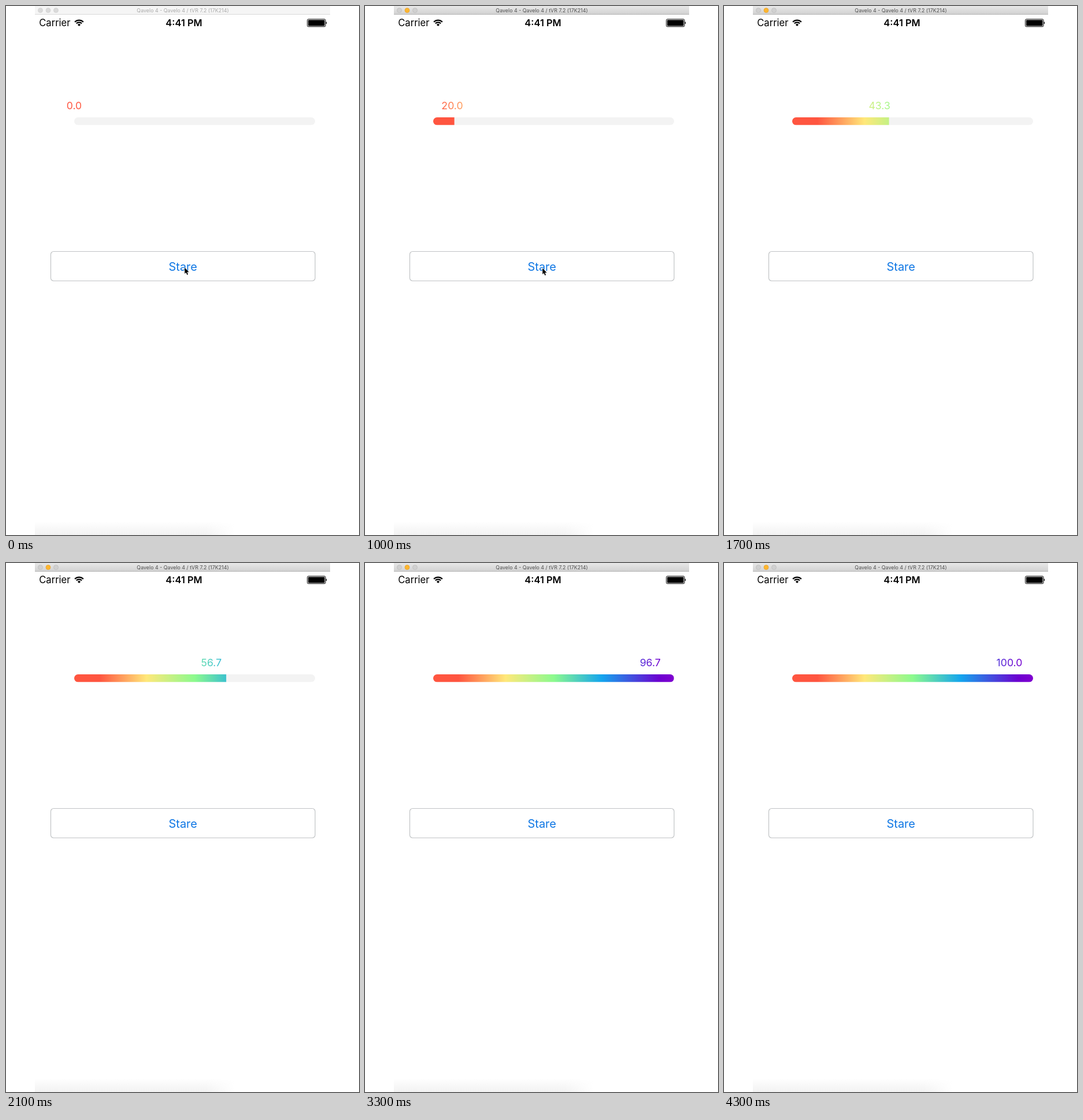
These frames come from a looping animation (611x917 px, 4.4 s). An HTML page:

```html
<!DOCTYPE html>
<html lang="en">
<head>
<meta charset="utf-8">
<title>Gradient progress bar</title>
<style>
  html, body { margin: 0; width: 100%; height: 100%; overflow: hidden; background: #fff; }
  svg { display: block; width: 100vw; height: 100vh; }
  text { font-family: Inter, Roboto, sans-serif; }
  .middle { text-anchor: middle; }
</style>
</head>
<body>
<svg viewBox="0 0 611 917">
  <defs>
    <linearGradient id="rainbow">
      <stop offset=".105" stop-color="#ff5540"/>
      <stop offset=".3" stop-color="#ffe87a"/>
      <stop offset=".5" stop-color="#8cfa8e"/>
      <stop offset=".7" stop-color="#14a5ee"/>
      <stop offset=".94" stop-color="#6d00d0"/>
      <stop offset="1" stop-color="#8000d0"/>
    </linearGradient>
    <linearGradient id="barPaint" href="#rainbow" gradientUnits="userSpaceOnUse" x1="118" x2="535"/>
    <linearGradient id="labelPaint" href="#rainbow" gradientUnits="userSpaceOnUse" x1="77" x2="535"/>
    <linearGradient id="titlePaint" x2="0" y2="1">
      <stop stop-color="#e8e8e8"/>
      <stop offset="1" stop-color="#d0d0d0"/>
    </linearGradient>
    <linearGradient id="shadowPaint" x2="0" y2="1">
      <stop stop-color="#fff"/>
      <stop offset="1" stop-color="#f2f2f2"/>
    </linearGradient>
    <linearGradient id="shadowEdge">
      <stop stop-color="#fff" stop-opacity="0"/>
      <stop offset="1" stop-color="#fff"/>
    </linearGradient>
    <clipPath id="track"><rect x="118" y="193" width="417" height="13.5" rx="6.75"/></clipPath>
  </defs>

  <rect x="50" y="893" width="345" height="24" fill="url(#shadowPaint)"/>
  <rect x="345" y="893" width="51" height="24" fill="url(#shadowEdge)"/>

  <!-- window title -->
  <rect id="titleBar" x="50" width="511" height="15"/>
  <path id="titleLine" d="M50 14.5H561"/>
  <g stroke-width=".7">
    <circle class="dot" cx="59.5" cy="7.5" r="4"/>
    <circle class="dot" id="middleDot" cx="73" cy="7.5" r="4"/>
    <circle class="dot" cx="86.5" cy="7.5" r="4"/>
  </g>
  <text id="title" class="middle" x="306" y="11" font-size="8.9">Qavelo 4 - Qavelo 4 / tVR 7.2 (17K214)</text>

  <!-- status bar -->
  <text x="57.2" y="35" font-size="16.6">Carrier</text>
  <g fill="none" stroke="#000" stroke-width="2.2">
    <path d="M119.1 27.6a10.5 10.5 0 0 1 14.8 0M121.8 30.3a6.6 6.6 0 0 1 9.4 0"/>
    <path d="M126.5 35l-2.6-2.6a3.6 3.6 0 0 1 5.2 0z" fill="#000" stroke="none"/>
  </g>
  <text class="middle" x="308" y="35" font-size="16.4" font-weight="600">4:41 PM</text>
  <rect x="521.5" y="22.8" width="31.5" height="13" rx="2" fill="none" stroke="#000"/>
  <rect x="523" y="24.2" width="28.5" height="10.2" rx=".8"/>
  <path d="M553.7 27q1.4 .4 1.4 2.3t-1.4 2.3z"/>

  <!-- progress -->
  <text id="label" class="middle" y="179" font-size="17.7" fill="url(#labelPaint)"></text>
  <g clip-path="url(#track)">
    <rect x="118" y="193" width="417" height="13.5" fill="#f3f3f3"/>
    <rect id="bar" x="118" y="193" height="13.5" fill="url(#barPaint)"/>
  </g>

  <!-- button -->
  <rect x="77.5" y="425.5" width="457.5" height="51" rx="5" fill="#fff" stroke="#c0c3c5" stroke-width="1.2"/>
  <text id="caption" class="middle" x="306.2" y="458.7" font-size="20" fill="#0f77e4">Stare</text>
  <path id="cursor" d="M0 0V10.4L2.4 8.3L4.1 12.3L5.8 11.6L4.1 7.6H7.4Z" stroke="#fff" stroke-width=".9" paint-order="stroke"/>
</svg>
<script>
  const LOOP = 4400, STEP = 100;
  const TRACK_X = 118, TRACK_WIDTH = 417, LABEL_TRAVEL = 376;
  const $ = id => document.getElementById(id);
  const clamp = v => Math.min(1, Math.max(0, v));
  const set = (element, attributes) => {
    for (const name in attributes) element.setAttribute(name, attributes[name]);
  };

  // cubic-bezier(.42, 0, .58, 1)
  function easeInOut(x) {
    let low = 0, high = 1;
    for (let i = 0; i < 24; i++) {
      const s = (low + high) / 2;
      if (1.26 * s - 0.78 * s * s + 0.52 * s ** 3 < x) low = s; else high = s;
    }
    return low * low * (3 - 2 * low);
  }

  function drawTitle(active) {
    set($('titleBar'), { fill: active ? 'url(#titlePaint)' : '#f5f5f5' });
    set($('titleLine'), { stroke: active ? '#b4b4b4' : '#dadada' });
    set($('title'), { fill: active ? '#505050' : '#aaa' });
    for (const dot of document.querySelectorAll('.dot')) {
      const lit = active && dot.id === 'middleDot';
      set(dot, { fill: lit ? '#fdb62f' : active ? '#d0d0d0' : '#dadada',
                 stroke: lit ? '#e5a02a' : active ? '#bababa' : '#d0d0d0' });
    }
  }

  function draw(t) {
    drawTitle(t >= 100);

    const value = 100 * clamp((t - 400) / 3000);
    const filled = t < 400 ? 0 : easeInOut(clamp((t - 384) / 2973));
    $('label').textContent = value.toFixed(1);
    set($('label'), { x: TRACK_X + LABEL_TRAVEL * filled });
    set($('bar'), { width: TRACK_WIDTH * filled });

    const pressed = t >= 200;
    set($('caption'), { opacity: pressed ? 0.2 + 0.8 * clamp((t - 400) / 200) : 1 });

    const drift = clamp((t - 600) / 400);
    set($('cursor'), {
      transform: `translate(${309.3 - 2 * drift} ${453.6 + drift})`,
      visibility: t < 1500 ? 'visible' : 'hidden'
    });
  }

  function tick() {
    const t = performance.now() % LOOP;
    draw(Math.floor(t / STEP) * STEP);
    requestAnimationFrame(tick);
  }
  tick();
</script>
</body>
</html>
```
